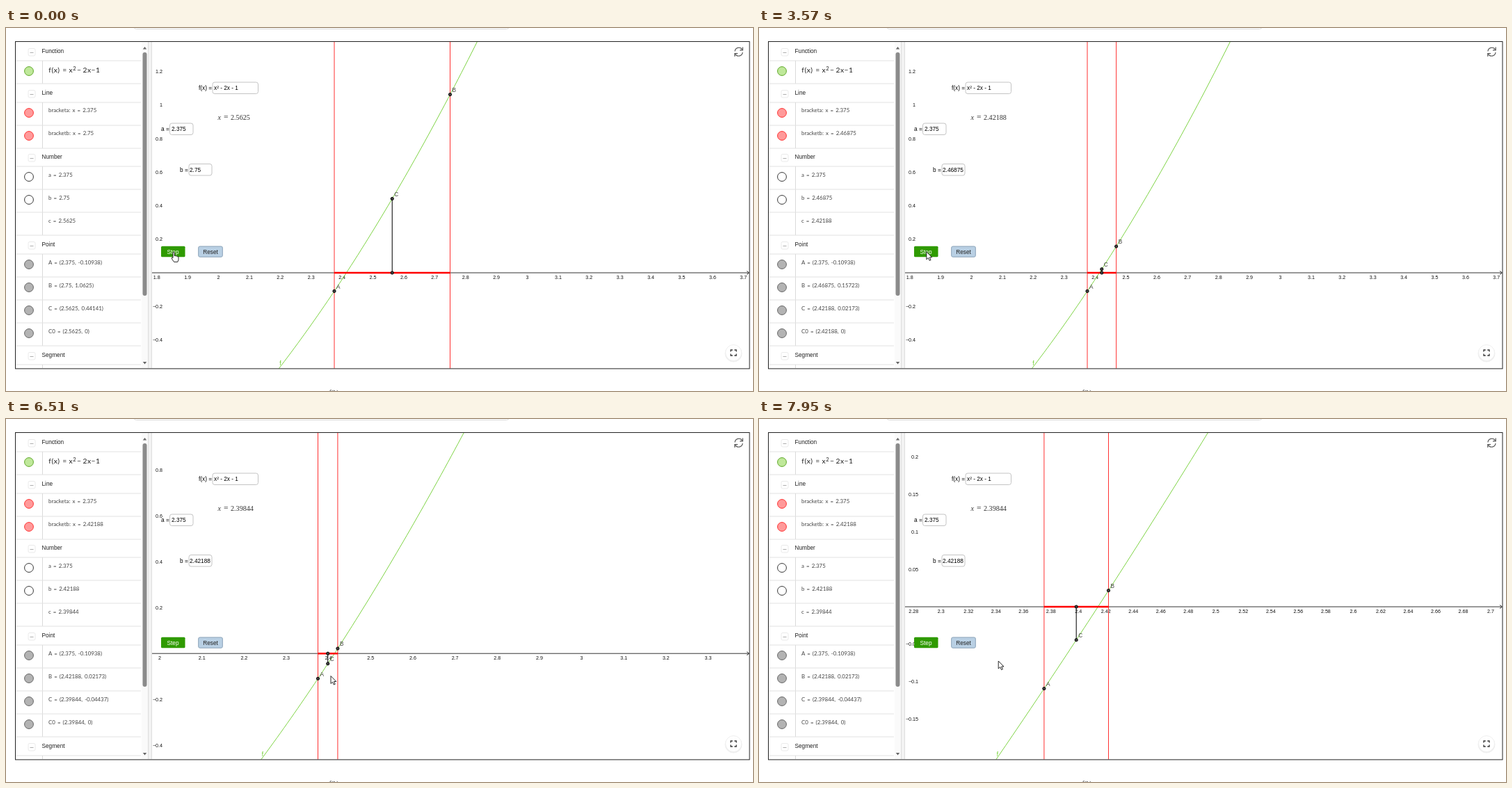
An HTML page that plays this animation: 1074x522 px, repeating every 8000 ms.

```html
<!DOCTYPE html>
<html lang="en">
<head>
<meta charset="utf-8">
<title>Bisection</title>
<style>
html, body { margin: 0; width: 100%; height: 100%; overflow: hidden; background: #fff; }
svg { display: block; width: 1074px; height: 522px; font: 8.25px "Liberation Sans", Arial, sans-serif; }
text { white-space: pre; }
.lato { font: 7.85px Lato, sans-serif; word-spacing: 1.1px; fill: #444; }
.big { font: 10.3px Lato, sans-serif; letter-spacing: .5px; fill: #222; }
.axis { font-size: 7.15px; fill: #111; }
.tex { font: 10.15px "Liberation Serif", serif; fill: #333; }
</style>
</head>
<body>
<svg id="stage" viewBox="0 0 1074 522">
  <defs><clipPath id="plot"><rect x="210" y="20" width="859" height="469.5"/></clipPath></defs>
  <g id="panel"></g>
  <g id="graph" clip-path="url(#plot)"></g>
  <g id="controls"></g>
  <g id="values"></g>
  <g id="frame"></g>
  <g id="cursor"></g>
</svg>
<script>
const LOOP = 8000, A = 2.375, RED = '#ff3030', GREEN = '#6c2';
const f = x => x * x - 2 * x - 1;
const num = v => String(+v.toFixed(5));
const put = (id, html) => { document.getElementById(id).innerHTML = html; };

const text = (x, y, s, attrs = '') => `<text x="${x}" y="${y}" ${attrs}>${s}</text>`;
const line = (x1, y1, x2, y2, color, w = 1) =>
  `<path d="M${x1} ${y1}L${x2} ${y2}" stroke="${color}" stroke-width="${w}"/>`;
const box = (x, y, w, h, fill, stroke, r = 0) =>
  `<rect x="${x}" y="${y}" width="${w}" height="${h}" rx="${r}" fill="${fill}" stroke="${stroke}"/>`;
const dot = (x, y, r, fill, stroke) =>
  `<circle cx="${x}" cy="${y}" r="${r}" fill="${fill}" stroke="${stroke}"/>`;

// Views: screen x of A, screen y of the axis, pixels per unit, label spacing
const wide = { ax: 472, y0: 352, sx: 444, sy: 241.3, dx: .1, dy: .2 };
const near = { ax: 448.5, y0: 337.2, sx: 606.5, sy: 330.2, dx: .1, dy: .2 };
const zoom = (v, k, cx, cy, dx, dy) => ({
  ax: cx + (v.ax - cx) * k, y0: cy + (v.y0 - cy) * k, sx: v.sx * k, sy: v.sy * k, dx, dy
});
const closer = zoom(near, 1.44, 465.9, 367.9, .05, .1);
const close = zoom(near, 2.163, 465.9, 367.9, .05, .05);
const closest = zoom(close, 1.506, 464.6, 363.7, .02, .05);

const button = [240.8, 321.8];
const steps = [
  { t: 0, b: 2.75, view: wide, at: button, hand: true },
  { t: 930, b: 2.5625, view: wide, at: button },
  { t: 3000, b: 2.46875, view: wide, at: button },
  { t: 5020, b: 2.421875, view: wide, at: button },
  { t: 5930, b: 2.421875, view: wide, at: [552, 401] },
  { t: 6510, b: 2.421875, view: near, at: [467, 369.5] },
  { t: 6930, b: 2.421875, view: closer, at: [466, 368] },
  { t: 7460, b: 2.421875, view: close, at: [464.6, 364] },
  { t: 7950, b: 2.421875, view: closest, at: [344.2, 348] }
];

const groups = [
  { name: 'Function', y: 20, rows: 1, fill: '#bfe89a', stroke: '#5fa82a' },
  { name: 'Line', y: 80, rows: 2, fill: '#ff9a9a', stroke: '#f33' },
  { name: 'Number', y: 172, rows: 3, fill: '#fff', stroke: '#333' },
  { name: 'Point', y: 298, rows: 4, fill: '#b3b3b3', stroke: '#666' },
  { name: 'Segment', y: 457, rows: 0 }
];

function drawPanel() {
  const rule = y => line(14, y, 194, y, '#e2e2e2');
  const divider = (y1, y2) => line(52.5, y1, 52.5, y2, '#dadada');
  let s = '';
  for (const g of groups) {
    const top = g.y + 27, end = top + 33 * g.rows;
    s += box(32, g.y + 9.5, 10, 10.5, '#fff', '#eaeaea', 2) + line(34.5, g.y + 15.5, 39.5, g.y + 15.5, '#999', .8);
    s += text(51.5, g.y + 16, g.name, 'fill="#222"') + rule(top) + divider(top, end);
    for (let i = 0; i < g.rows; i++) {
      const y = top + 33 * i;
      if (i) s += rule(y);
      if (g.name !== 'Number' || i < 2) s += dot(33, y + 15, 6.4, g.fill, g.stroke);
    }
    if (g.rows) s += rule(end);
  }
  s += divider(484, 489);
  s += [[61.3, 'f(x)'], [81.3, '='], [90.6, 'x'], [102, '−'], [110.5, '2'], [117, 'x'], [122.6, '−'], [129, '1']]
    .map(([x, c]) => text(x, 64.3, c, 'class="big"')).join('');
  s += text(96.2, 61, '2', 'class="big" style="font-size:7.6px"');
  s += '<path d="M195 20H205V489H195Z" fill="#fafafa"/><path d="M205 20H210V489H205Z" fill="#f3f3f3"/>';
  s += line(204.5, 20, 204.5, 489, '#ddd') + line(209.5, 20, 209.5, 489, '#ddd');
  s += '<rect x="196.5" y="35" width="6" height="350" rx="3" fill="#8b8b8b"/>';
  s += '<path d="M196.8 30.5H202.2L199.5 27ZM196.8 480H202.2L199.5 483.5Z" fill="#666"/>';
  put('panel', s);
}

function drawControls() {
  const field = (x, y, w) => box(x, y, w, 16.5, '#fff', '#c4c4c4', 3);
  put('controls',
    text(277, 89, 'f(x) =') + field(297, 78, 65.5) + text(299, 89, 'x² - 2x - 1') +
    text(223, 148.3, 'a =') + field(235.5, 137, 33.5) + text(238, 148.3, num(A)) +
    text(250, 206.8, 'b =') + field(263, 195.5, 33) +
    '<rect x="223" y="313.7" width="34.5" height="15.6" rx="1.5" fill="#2f9a00"/>' +
    text(240, 324.8, 'Step', 'fill="#fff" text-anchor="middle"') +
    box(276.7, 314, 34.6, 15.2, '#b9d0e4', '#8aa2b8', 2) +
    text(294, 324.8, 'Reset', 'fill="#222" text-anchor="middle"'));
}

function drawFrame() {
  put('frame',
    box(183.5, -10, 540, 11.5, '#fff', '#ddd', 4) +
    box(13.5, 19.5, 1055.5, 470.4, 'none', '#222') +
    text(471, 528.4, 'f(k)', 'text-anchor="middle" style="font:italic 10px \'Liberation Serif\',serif"') +
    '<g fill="none" stroke="#555" stroke-width="1.2">' +
    '<path d="M1048 33.5A5.7 5.7 0 0 1 1058.7 31.3M1059 35A5.7 5.7 0 0 1 1048.3 37.2"/>' +
    '<path d="M1059.2 27.5V31.8H1055M1047.8 41V36.7H1052"/></g>' +
    dot(1046, 468, 12, '#f1f1f1', '#eee') + dot(1046, 467, 11.5, '#fff', '#f0f0f0') +
    '<path d="M1042 465.5V463H1044.7M1047.3 463H1050V465.5M1050 468.5V471H1047.3M1044.7 471H1042V468.5" fill="none" stroke="#333" stroke-width="1.3"/>');
}

function drawGraph({ b, view: v }) {
  const X = x => v.ax + (x - A) * v.sx, Y = y => v.y0 - y * v.sy;
  const c = (A + b) / 2;
  let s = line(210, v.y0, 1068, v.y0, '#333') +
    `<path d="M1065 ${v.y0 - 2.5}L1068.5 ${v.y0}L1065 ${v.y0 + 2.5}" fill="none" stroke="#333"/>`;

  const label = (k, d) => String(+(k * d).toFixed(2)).replace('-', '−');
  for (let k = Math.ceil((212 - v.ax) / v.sx / v.dx + A / v.dx); X(k * v.dx) < 1064; k++)
    s += text(X(k * v.dx), v.y0 + 9.1, label(k, v.dx), 'class="axis" text-anchor="middle"');
  const right = v.dy < .1 ? 229 : 225;
  for (let k = Math.ceil((v.y0 - 482) / v.sy / v.dy); Y(k * v.dy) > 25; k++)
    if (k) s += text(right, Y(k * v.dy) + 2.6, label(k, v.dy), 'class="axis" text-anchor="end"');

  // Upper branch of the parabola across the visible height
  const inv = py => 1 + Math.sqrt(2 + (v.y0 - py) / v.sy);
  const from = inv(492), to = inv(17), pts = [];
  for (let i = 0; i <= 60; i++) {
    const x = from + (to - from) * i / 60;
    pts.push(X(x).toFixed(2) + ' ' + Y(f(x)).toFixed(2));
  }
  s += `<path d="M${pts.join('L')}" fill="none" stroke="${GREEN}" stroke-width=".85"/>`;
  s += text(X(inv(490)) + 1.2, 484.5, 'f', `fill="${GREEN}"`);

  s += line(X(A), 19, X(A), 490, RED) + line(X(b), 19, X(b), 490, RED);
  s += line(X(A), v.y0, X(b), v.y0, '#f00', 2.5);
  s += line(X(c), v.y0, X(c), Y(f(c)), '#111', 1.1);
  s += dot(X(c), v.y0, 2.1, '#444', '#000');
  for (const [name, x] of [['A', A], ['B', b], ['C', c]])
    s += dot(X(x), Y(f(x)), 2.1, '#444', '#000') +
      text(X(x) + 3, Y(f(x)) - 3.8, name, 'fill="#444"');
  put('graph', s);
}

function drawValues({ b }) {
  const c = (A + b) / 2;
  const pair = x => `(${num(x)}, ${num(f(x))})`;
  const rows = (y, list) => list.map((s, i) => text(61, y + 33 * i, s, 'class="lato"')).join('');
  put('values',
    rows(121.4, [`bracketa: x = ${num(A)}`, `bracketb: x = ${num(b)}`]) +
    rows(214.1, [`a = ${num(A)}`, `b = ${num(b)}`, `c = ${num(c)}`]) +
    rows(340.1, [`A = ${pair(A)}`, `B = ${pair(b)}`, `C = ${pair(c)}`, `C0 = (${num(c)}, 0)`]) +
    text(264, 206.8, num(b)) +
    text(304.5, 131.5, 'x', 'class="tex" style="font-style:italic"') +
    text(313, 131.5, '=', 'class="tex" style="font-size:11.5px"') +
    text(323, 131.5, num(c), 'class="tex"'));
}

function drawCursor({ at: [x, y], hand }) {
  const arrow = 'M0 0V11L2.6 8.7L4.3 12.6L6.2 11.8L4.5 8H7.8Z';
  const finger = 'M-.8 1Q.4 -.8 1.4 1V6Q2.7 4.9 3.6 6.2Q5 5.5 5.6 6.9Q7.2 6.5 7.2 8.3V11.4L6 14.6H.7L-2.6 9.7Q-3.2 7.7 -.8 8.7Z';
  put('cursor', `<path transform="translate(${x} ${y})" d="${hand ? finger : arrow}" fill="#fff" stroke="#111" stroke-width=".9" stroke-linejoin="round"/>`);
}

let shown = null;
function render(t) {
  const step = steps.filter(s => s.t <= t).pop();
  if (step === shown) return;
  shown = step;
  drawGraph(step);
  drawValues(step);
  drawCursor(step);
}

function tick() {
  render(performance.now() % LOOP);
  requestAnimationFrame(tick);
}

drawPanel();
drawControls();
drawFrame();
tick();
</script>
</body>
</html>
```
